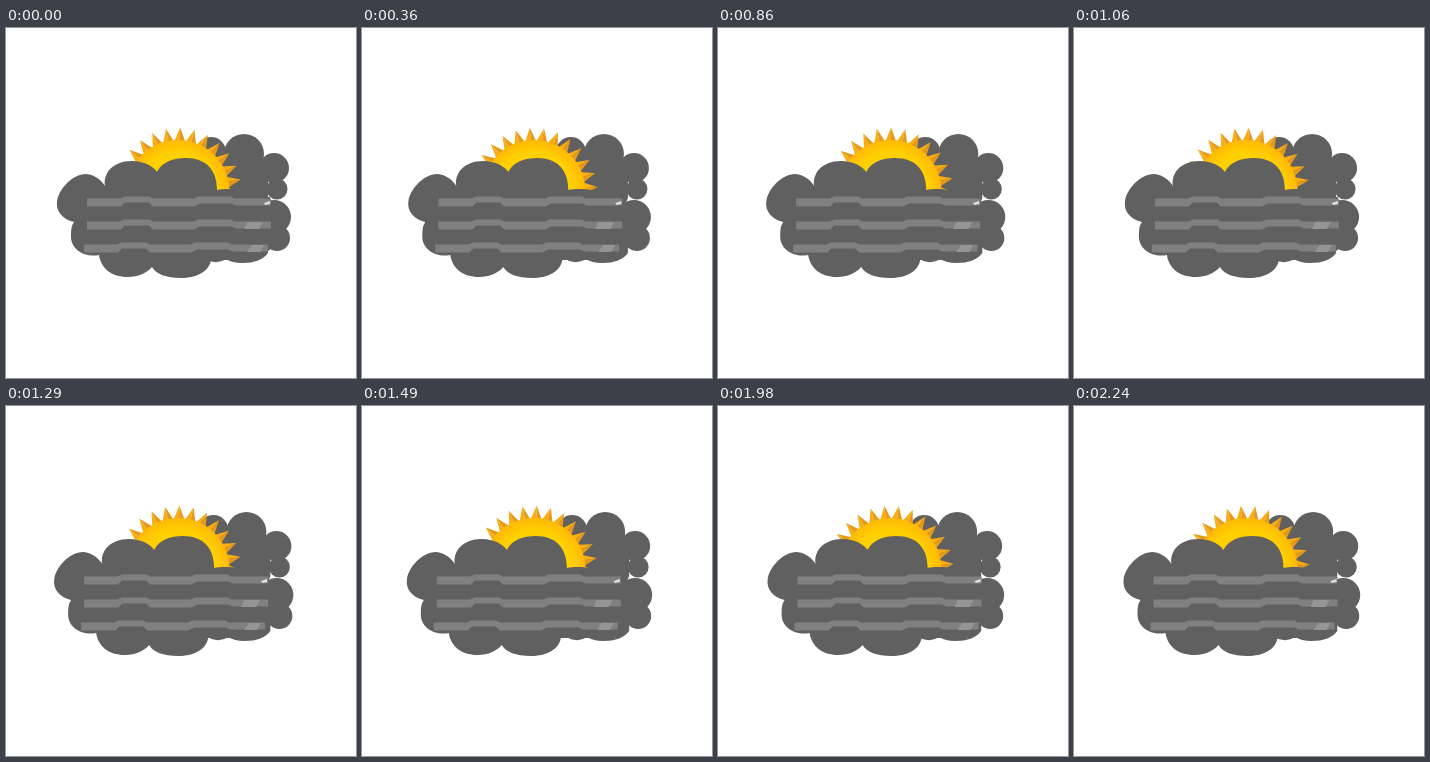
Write an HTML page that moves like this. It is 350 px wide and 350 px high and loops after 2280 ms.

```html
<!DOCTYPE html>
<html lang="en">
<head>
<meta charset="utf-8">
<title>Sun behind clouds</title>
<style>
html, body { margin: 0; width: 100%; height: 100%; overflow: hidden; background: #fff; }
svg { display: block; width: 100vw; height: 100vh; }
</style>
</head>
<body>
<svg viewBox="0 0 350 350">
  <defs>
    <radialGradient id="glow">
      <stop offset=".75" stop-color="#ffd000"/>
      <stop offset="1" stop-color="#ffb908"/>
    </radialGradient>
    <path id="bar" d="M0 1H33L38-1H62L66 1H107L111-1H144L147 1H184V8H149L144 6H113L107 9H66L62 5H38L34 9H0Z"/>
  </defs>
  <g id="back" fill="#606060">
    <path d="M192 130H262V170L260 175 262 178V225Q255 235 236 235 226 235 220 231 213 236 203 233L192 225Z"/>
    <circle cx="205" cy="124" r="15"/>
    <circle cx="238" cy="126" r="20"/>
    <circle cx="268" cy="140" r="15"/>
    <circle cx="271" cy="161" r="10.5"/>
    <circle cx="268" cy="189" r="17"/>
    <circle cx="271" cy="210" r="13"/>
  </g>
  <g id="sun"></g>
  <g id="front">
    <path fill="#606060" d="M93 227C80 230 64 222 65 207 65 200 66 197 68 194 56 191 50 183 51 174 52 162 66 146 80 146 90 147 96 153 99 158 97 146 106 133 126 133 138 133 147 138 151 144 156 134 167 130 180 130 200 130 211 142 211 162 222 160 240 161 252 168L264 169V222L240 232H205C203 244 190 250 175 250 160 250 150 246 146 239 141 245 132 249 122 249 105 249 95 240 93 227Z"/>
    <g fill="#808080">
      <use href="#bar" x="81" y="169.500"/>
      <use href="#bar" x="81" y="192.500"/>
      <use href="#bar" x="78" y="215.500"/>
    </g>
    <path fill="#959595" d="M241 194H257L253 201H238ZM246 217H258L254 224H241Z"/>
    <path fill="#e0e0e0" d="M258 175L264 173V176L259 177Z"/>
  </g>
</svg>
<script>
const LOOP = 2280, HALF = 517, START = 40, RAYS = 28;
const el = id => document.getElementById(id);

const at = (r, deg) => {
  const a = deg * Math.PI / 180;
  return `${(r * Math.sin(a)).toFixed(2)} ${(-r * Math.cos(a)).toFixed(2)}`;
};
let shapes = '';
for (let i = 0; i < RAYS; i++) {
  const step = 360 / RAYS, a = 2 + i * step;
  const half = (side, color) =>
    `<path fill="${color}" d="M${at(47, a)}L${at(64, a)} ${at(50, a + side * step / 2)}Z"/>`;
  shapes += half(-1, '#f8ae12') + half(1, '#e69a1a');
}
el('sun').innerHTML = shapes + '<circle r="51.500" fill="url(#glow)"/>';

// 0 at rest, 1 at the far end of the sway
function sway(t) {
  if (t < 100) return 0;
  const p = (t - START) / HALF % 2;
  const line = p < 1 ? p : 2 - p;
  return (line + (1 - Math.cos(Math.PI * line)) / 2) / 2;
}

function draw(now) {
  const s = sway(now % LOOP);
  el('front').setAttribute('transform', `translate(${-7.2 * s})`);
  el('back').setAttribute('transform', `translate(${6 * s})`);
  el('sun').setAttribute('transform', `translate(172 163.500) rotate(${30.5 * s})`);
}

const begin = performance.now();
function frame() {
  draw(performance.now() - begin);
  requestAnimationFrame(frame);
}
frame();
</script>
</body>
</html>
```
